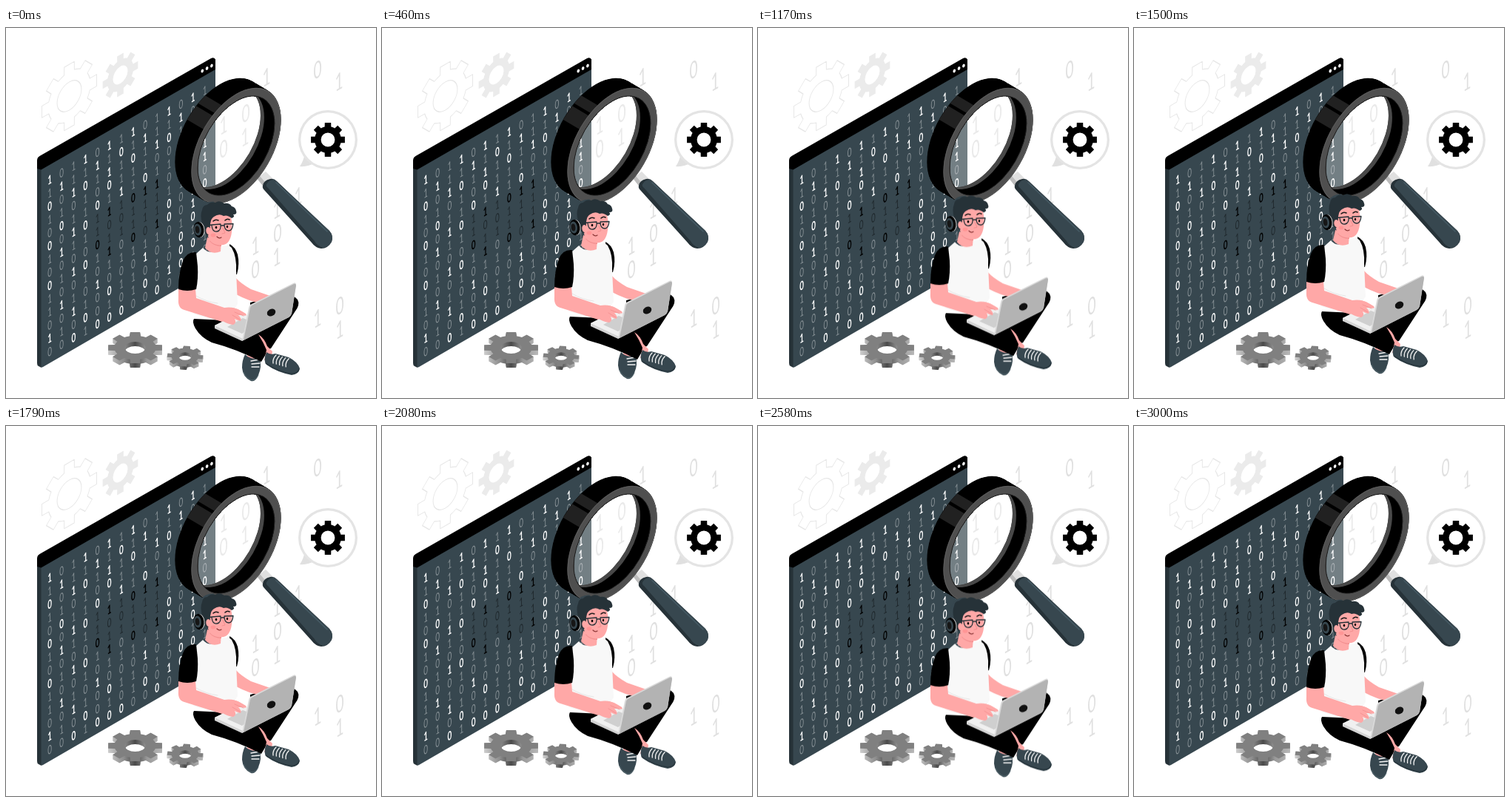
Recreate the animation shown at these times as an HTML page with a canvas. Size 500 by 500 pixels, loop 3.04 s.

```html
<!DOCTYPE html>
<html lang="en">
<head>
<meta charset="utf-8">
<title>Code inspection</title>
<style>
html, body { margin: 0; width: 100%; height: 100%; overflow: hidden; background: #fff; }
canvas { display: block; width: 500px; height: 500px; }
</style>
</head>
<body>
<canvas id="stage"></canvas>
<script>
const SIZE = 500, LOOP = 3040, STEP = 125 / 3, RISE = 10;
const TAU = Math.PI * 2;
const BLACK = '#000', SLATE = '#37474f', NIGHT = '#263238';
const SKIN = '#ffa8a7', SKIN_DARK = '#f28f8f', PALE = '#ebebeb';
const dpr = window.devicePixelRatio || 1;

function prepare(canvas) {
  canvas.width = canvas.height = SIZE * dpr;
  const c = canvas.getContext('2d');
  c.scale(dpr, dpr);
  c.lineCap = c.lineJoin = 'round';
  return c;
}

const stage = prepare(document.getElementById('stage'));
const scene = document.createElement('canvas');
const man = document.createElement('canvas');
let ctx;

function fill(d, color) {
  ctx.fillStyle = color;
  ctx.fill(new Path2D(d));
}

function line(d, color, width = 1) {
  ctx.strokeStyle = color;
  ctx.lineWidth = width;
  ctx.stroke(new Path2D(d));
}

function oval(x, y, rx, ry, color, turn = 0) {
  ctx.beginPath();
  ctx.ellipse(x, y, rx, ry, turn, 0, TAU);
  ctx.fillStyle = color;
  ctx.fill();
}

// Runs draw() on a plane facing the viewer's left, centred on x, y.
function onWall(x, y, draw, width = 0.866) {
  ctx.save();
  ctx.transform(width, -width * 0.577, 0, 1, x, y);
  draw();
  ctx.restore();
}

// A disc on the wall plane as a path in stage coordinates.
function wallDisc(x, y, r) {
  const disc = new Path2D(), path = new Path2D();
  disc.arc(0, 0, r, 0, TAU);
  path.addPath(disc, new DOMMatrix([0.866, -0.5, 0, 1, x, y]));
  return path;
}

function gearPath(outer, root, hole, phase = 0, teeth = 8) {
  const p = new Path2D(), pitch = TAU / teeth;
  for (let i = 0; i < teeth; i++) {
    const mid = phase + i * pitch;
    for (const [off, r] of [[-0.31, root], [-0.23, outer], [0.23, outer], [0.31, root]]) {
      const a = mid + off * pitch;
      p.lineTo(r * Math.cos(a), r * Math.sin(a));
    }
    p.arc(0, 0, root, mid + 0.31 * pitch, mid + 0.69 * pitch);
  }
  p.closePath();
  p.moveTo(hole, 0);
  p.arc(0, 0, hole, 0, TAU);
  return p;
}

function digit(char, x, y, size, weight, color) {
  onWall(x, y, () => {
    ctx.font = `${weight} ${size}px Lato, "Open Sans", sans-serif`;
    ctx.textAlign = 'center';
    ctx.fillStyle = color;
    ctx.fillText(char, 0, size * 0.36);
  }, 0.6);
}

function drawWallGears() {
  onWall(85.5, 92, () => {
    ctx.strokeStyle = '#e6e6e6';
    ctx.lineWidth = 1.1;
    ctx.stroke(gearPath(43.5, 33, 19));
  });
  onWall(154.5, 63.5, () => {
    ctx.fillStyle = PALE;
    ctx.fill(gearPath(28, 20.5, 11.5), 'evenodd');
  });
}

function drawLooseDigits() {
  const spots = [
    [352, 66, 1], [421, 56, 0], [450, 72, 1], [294, 131, 1], [324, 115, 0],
    [294, 163, 0], [323, 147, 1], [395, 227, 1], [366, 245, 1], [367, 277, 0],
    [337, 294, 1], [366, 309, 1], [337, 326, 0], [421, 392, 1], [451, 375, 0], [451, 407, 1]
  ];
  for (const [x, y, n] of spots) digit(n, x, y, 32, 400, '#e0e0e0');
}

// 1 0 bright, i o dim, B Q black, j q faint
const COLUMNS = [
  '1i0io0io0iio1o', 'o1oi0o1oio1oio', 'ii1oi1io1oi1o0', '1i0ii0io0ioi0i',
  'o1io0jjQio1oo0', '1i10iBqjBio0i0', 'i0ii1jqjoioio0', '1i0iiQjjQioiio',
  'o1ii0Bjjqi1o0o', 'ii1oiBjjBioio0', '1i0oioi00oio1o', 'o1iiioiooi000o',
  '1oiioio110i0io', 'ioii11o0oioioi'
];

function inkOf(key) {
  if ('10'.includes(key)) return [700, '#fff'];
  if ('io'.includes(key)) return [400, 'rgba(255,255,255,.4)'];
  if ('BQ'.includes(key)) return [700, '#000'];
  return [400, 'rgba(0,0,0,.45)'];
}

function drawWindow() {
  fill('M42 180 L48 190 V459 L44 457 Q42 456 42 453Z', NIGHT);
  fill('M47.5 190 L283 55 V323 L50 458 Q47.5 459.5 47.5 457Z', SLATE);
  fill('M42 190 V179 Q42 175 45.5 173 L277 41 Q281 39 283 42.5 V56 L47.5 191.5Z', BLACK);
  for (let i = 0; i < 3; i++) oval(265.3 + i * 6.3, 58 - i * 3.5, 1.7, 2.5, '#fff', 0.4);

  COLUMNS.forEach((column, c) => {
    [...column].forEach((key, r) => {
      const [weight, color] = inkOf(key);
      const char = '1iBj'.includes(key) ? '1' : '0';
      digit(char, 59 + c * 16.13, 205 + r * 17.85 - c * 9.28, 16.5, weight, color);
    });
  });
}

function drawMagnifier() {
  const x = 311, y = 159, depth = [-22, -13];
  fill('M339 203 L351 194 L364 207 L350 217Z', '#e0e0e0');
  fill('M339 203 L343 200 L354 213 L350 217Z', '#bdbdbd');
  fill('M347 213 Q348 206 357 204 Q362 203 366 207 L437 274 Q443 281 440 289 Q435 298 426 298 Q418 297 413 290 L349 219 Q346 216 347 213Z', NIGHT);
  fill('M352 211 Q356 204 363 205 L437 274 Q443 281 440 289 Q436 296 428 297 Q420 294 417 288 L354 216 Q351 214 352 211Z', SLATE);
  line('M365 209 L434 275', '#455a64', 1.5);

  // Rim: a ring pushed back along its depth, kept open in the middle.
  ctx.save();
  const open = new Path2D();
  open.rect(0, 0, SIZE, SIZE);
  open.addPath(wallDisc(x, y, 60));
  ctx.clip(open, 'evenodd');
  ctx.fillStyle = BLACK;
  for (let i = 44; i >= 0; i--) {
    ctx.fill(wallDisc(x + depth[0] * i / 44, y + depth[1] * i / 44, 70));
  }
  const rimAt = deg => {
    const a = deg * Math.PI / 180;
    return [x + depth[0] + 60.6 * Math.cos(a), y + depth[1] - 35 * Math.cos(a) + 70 * Math.sin(a)];
  };
  for (const [from, to] of [[-137, -122], [-119, -109]]) {
    const [ax, ay] = rimAt(from), [bx, by] = rimAt(to);
    fill(`M${ax} ${ay} L${bx} ${by} l22 13 L${ax + 22} ${ay + 13}Z`, '#212121');
  }
  ctx.fillStyle = '#4f4f4f';
  ctx.fill(wallDisc(x, y, 70));
  ctx.strokeStyle = '#606060';
  ctx.lineWidth = 0.8;
  ctx.stroke(wallDisc(x, y, 69.4));
  ctx.restore();

  // Inner side of the rim, then the glass set back inside it.
  ctx.save();
  ctx.clip(wallDisc(x, y, 60));
  const glass = wallDisc(x - 19, y - 11, 60);
  for (const [back, color] of [[0, BLACK], [14, '#484848']]) {
    const wall = new Path2D(), inner = new Path2D();
    inner.rect(0, 0, SIZE, SIZE);
    inner.addPath(glass);
    wall.addPath(wallDisc(x - back, y - back * 0.58, 60));
    ctx.save();
    ctx.clip(inner, 'evenodd');
    ctx.fillStyle = color;
    ctx.fill(wall);
    ctx.restore();
  }
  ctx.fillStyle = 'rgba(255,255,255,.3)';
  ctx.fill(glass);
  ctx.restore();
  ctx.strokeStyle = '#1c1c1c';
  ctx.lineWidth = 1;
  ctx.stroke(wallDisc(x, y, 60));
}

function drawBubble() {
  fill('M404 169 Q402 180 397 187 Q408 188 418 182Z', '#e0e0e0');
  oval(435, 151, 40, 40, '#e4e4e4');
  oval(435, 151, 36.7, 36.7, '#fff');
  ctx.save();
  ctx.translate(435, 151);
  ctx.fillStyle = BLACK;
  ctx.fill(gearPath(23.3, 18, 9.4), 'evenodd');
  ctx.restore();
}

function drawFloorGear(x, y, r, hole, thick, phase) {
  const shape = gearPath(r, r * 0.76, hole, phase);
  const layer = (dy, color) => {
    ctx.save();
    ctx.translate(x, y + dy);
    ctx.scale(1, 0.577);
    ctx.fillStyle = color;
    ctx.fill(shape, 'evenodd');
    ctx.restore();
  };
  const side = ctx.createLinearGradient(-r, 0, r, 0);
  [[0, '#cfcfcf'], [0.3, '#8c8c8c'], [0.5, '#4a4a4a'], [0.72, '#9a9a9a'], [1, '#b8b8b8']]
    .forEach(([at, color]) => side.addColorStop(at, color));
  for (let d = thick; d > 0; d -= 0.5) layer(d, side);
  layer(0, '#808080');
}

function drawHead() {
  fill('M272 283 L269 297 Q277 307 290 302 L291 288Z', SKIN);
  fill('M275 288 Q281 295 291 295 L291 290 Q283 290 277 284Z', SKIN_DARK);
  fill('M271 253 Q287 246 303 253 Q307 264 305 276 Q303 291 294 293 Q282 295 275 287 Q270 276 271 253Z', SKIN);
  line('M262 266 Q260 250 265 243 Q269 236 280 236', SLATE, 3);
  fill('M265 264 Q262 253 265 246 Q266 239 272 239 Q276 234 283 236 Q288 232 295 237 Q302 236 305 241 Q310 242 311 247 Q313 252 307 252 Q310 255 305 257 Q299 252 294 254 Q288 250 281 255 Q277 257 276 265 Q276 272 273 281 Q268 279 265 264Z', NIGHT);
  oval(273.5, 274, 3.2, 5, SKIN, -0.1);
  oval(262, 272.5, 6.5, 10.5, '#cfcfcf', -0.12);
  oval(260.5, 272.5, 7, 10.7, BLACK, -0.12);
  oval(259, 272.5, 5, 8, SLATE, -0.12);
  oval(258.5, 272.5, 2.8, 5, '#161616', -0.12);

  line('M280 261 Q283 258 287 260 M296 260 Q299 257 302 259', '#1b1b1b', 1.6);
  oval(284, 269.5, 1.3, 1.8, BLACK);
  oval(299, 268.5, 1.2, 1.7, BLACK);
  line('M271 267 L278 266 L290 265 Q291 274 285 275 Q279 276 278 267 M290 267.5 Q293 266 295 267.5 M295 265 L307 264.5 Q306 274 301 274 Q295 274 295 265', NIGHT, 1.3);
  line('M293 270 L296 277 L292 278', SKIN_DARK, 1);
  oval(280, 280, 3.4, 2.4, '#ff9696');
  line('M285 282 Q288 285 291 283', '#8d3838', 1.2);
}

function drawLegs() {
  fill('M326 434 L340 438 L340 448 L326 448Z', SKIN);
  fill('M323 441 Q331 449 343 446 Q346 458 341 469 Q337 479 331 477 Q320 472 319 459 Q319 449 323 441Z', SLATE);
  line('M321 465 Q324 473 332 476 Q338 476 341 469', '#546970', 1);
  line('M331 450 L342 448 M332 454 L343 453 M332 458 L342 458', '#f5f5f5', 1.3);

  fill('M254 393 Q251 397 256 406 Q263 418 278 425 Q312 434 345 451 L354 436 Q349 423 340 415 L318 396Z', BLACK);
  fill('M330 371 L373 360 Q388 359 394 367 Q398 374 390 384 L358 433 Q353 435 349 428 L340 416 L331 404Z', BLACK);
  fill('M341 414 Q349 419 353 430 L360 437 L359 444 L349 449 Q351 440 352 435 Q348 425 341 414Z', SKIN);

  fill('M352 438 Q357 442 364 440 L382 445 Q394 451 397 460 Q396 468 386 469 Q366 465 352 455 Q347 449 352 438Z', SLATE);
  line('M351 453 Q368 465 386 467 Q394 467 396 461', '#26343b', 1.2);
  for (let i = 0; i < 5; i++) line(`M${365 + i * 4.3} ${442 + i * 1.2} q-5 5 -4 11`, '#f5f5f5', 1.3);
}

function drawBody() {
  fill('M311 338 Q317 345 331 353 L357 362 Q354 370 344 372 Q328 369 311 360Z', SKIN);
  fill('M302 292 Q310 296 313 306 Q316 319 312 333 L304 333Z', BLACK);
  fill('M266 297 Q276 309 292 295 Q301 292 305 297 Q312 309 311 329 L313 373 Q303 390 283 392 Q266 392 253 386 L257 350 L257 305Z', '#f8f8f8');
  line('M257 362 Q270 370 286 372', '#e6e6e6', 1);
  fill('M233 351 L256 352 L257 365 L295 378 Q307 376 317 382 L324 386 Q322 390 315 388 Q317 395 310 399 Q302 403 292 397 L241 381 Q232 379 233 366Z', SKIN);
  fill('M257 303 Q244 302 239 315 Q233 331 233 353 Q245 357 257 353 Q260 339 259 322Z', BLACK);
}

function drawLaptop() {
  fill('M282 402 L316 385 L348 397 L322 421 L319 423 L282 406Z', '#d4d4d4');
  fill('M282 402 L316 385 L348 397 L320 420Z', '#f0f0f0');
  fill('M299 404 L320 392 L338 399 L319 413Z', '#cfcfcf');
  fill('M293 380 Q306 375 317 382 L325 387 Q325 390 319 388 L314 388 Q319 393 317 396 Q312 395 309 393 Q312 399 307 401 Q298 400 290 394Z', SKIN);
  line('M309 384 L321 389 M306 388 L316 394', SKIN_DARK, 0.8);
  fill('M319 423 L328 378 Q329 374 332 373 L388 345 Q392 343 392 347 L386 386 Q385 389 382 391Z', '#d9d9d9');
  fill('M321 422 L330 378 Q331 375 334 374 L389 346 Q392 345 392 348 L386 386 Q385 389 382 391Z', '#b3b3b3');
  oval(358.5, 384.5, 6, 4.7, '#111', -0.5);
}

ctx = prepare(scene);
drawWallGears();
drawLooseDigits();
drawWindow();
drawMagnifier();
drawBubble();
drawFloorGear(174.5, 432, 37, 14, 6, 0);
drawFloorGear(242, 443.5, 24.5, 9, 4.5, 0.1);

ctx = prepare(man);
drawLegs();
drawBody();
drawHead();
drawLaptop();

// The figure drifts up and back at a steady speed, 24 steps a second.
function frame(now) {
  const step = Math.floor((now % LOOP + 5) / STEP) % 73;
  const lift = RISE * (1 - Math.abs(1 - Math.min(step, 72) / 36));
  stage.fillStyle = '#fff';
  stage.fillRect(0, 0, SIZE, SIZE);
  stage.drawImage(scene, 0, 0, SIZE, SIZE);
  stage.drawImage(man, 0, -lift, SIZE, SIZE);
  requestAnimationFrame(frame);
}
frame(performance.now());
</script>
</body>
</html>
```
